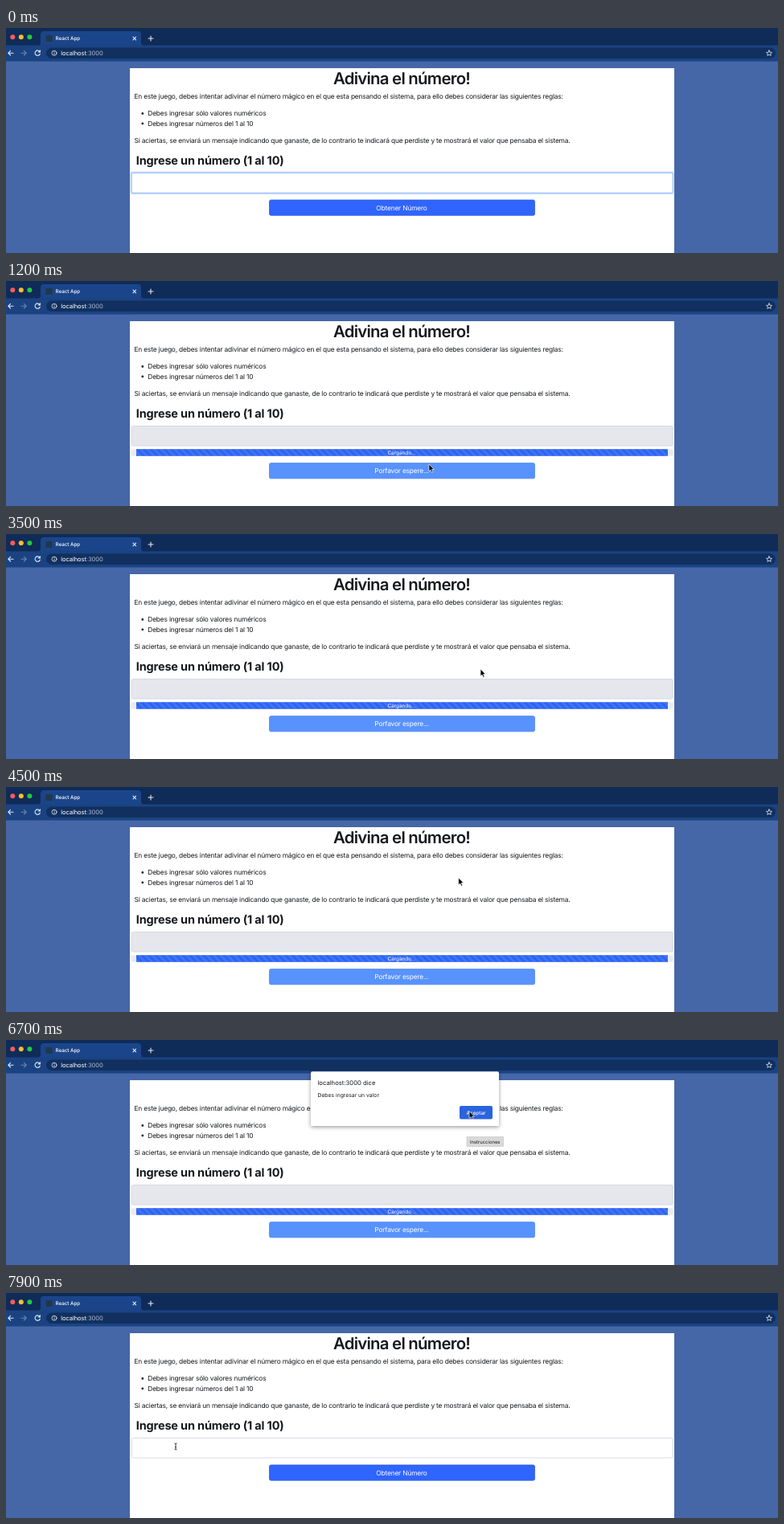
Animation, 960 px wide and 280 px high, one loop 8 s. Source, as an HTML page:

```html
<!DOCTYPE html>
<html lang="es">
<head>
<meta charset="utf-8">
<title>Adivina el número</title>
<style>
  html, body { margin: 0; width: 100%; height: 100%; overflow: hidden; background: #4567a7; }
  svg { display: block; width: 960px; height: 280px; }
  text { font-family: Inter, "Open Sans", sans-serif; font-size: 8.4px; fill: #16191d; text-rendering: geometricPrecision; white-space: pre; }
  .body { letter-spacing: -.183px; }
  .mid { text-anchor: middle; }
  .light { fill: #fff; }
  .line { fill: none; stroke: #e4ebf5; stroke-width: 1.1; stroke-linecap: round; stroke-linejoin: round; }
  .thin { stroke-width: .8; }
  .arrow { fill: #000; stroke: #fff; stroke-width: .7; stroke-linejoin: round; }
</style>
</head>
<body>
<svg viewBox="0 0 960 280">
  <defs>
    <pattern id="stripes" width="8.5" height="8.5" patternUnits="userSpaceOnUse">
      <path d="M0 0H4.25L8.5 4.25V8.5ZM0 4.25L4.25 8.5H0Z" fill="#fff" fill-opacity=".11"/>
    </pattern>
    <filter id="shadow" x="-10%" y="-20%" width="120%" height="150%">
      <feDropShadow dx="0" dy="1.5" stdDeviation="2.5" flood-opacity=".4"/>
    </filter>
  </defs>

  <!-- browser -->
  <rect width="960" height="280" fill="#4567a7"/>
  <rect width="960" height="22" fill="#0f2b57"/>
  <path d="M39 22Q43 22 43 18V8Q43 4 47 4H164Q168 4 168 8V18Q168 22 172 22Z" fill="#1b458a"/>
  <rect y="21.5" width="960" height="20" fill="#1b4382"/>
  <rect x="50" y="24.5" width="907" height="13.5" rx="6.75" fill="#11305f"/>
  <circle cx="8.3" cy="11.3" r="3" fill="#fc5b57"/>
  <circle cx="18.8" cy="11.3" r="3" fill="#fdbc2e"/>
  <circle cx="29.4" cy="11.3" r="3" fill="#28c840"/>
  <rect x="49.5" y="9" width="8" height="8" fill="#20384a"/>
  <text x="61.5" y="15.4" class="light" style="font-size:6.3px;font-weight:500;letter-spacing:-.05px">React App</text>
  <g class="line">
    <path d="M158 11.2L161.6 14.8M161.6 11.2L158 14.8M177 13H183M180 10V16"/>
    <path d="M9 31.2H2.8M5.6 28.4L2.8 31.2L5.6 34"/>
    <path d="M19 31.2H25.2M22.4 28.4L25.2 31.2L22.4 34" opacity=".4"/>
    <path d="M42 29.4A3.2 3.2 0 1 0 42.3 32.2M42.4 27.8V30H40.2"/>
    <g class="thin">
      <circle cx="60" cy="31.2" r="3"/><path d="M60 31V32.8M60 29.5V29.6"/>
      <path d="M949 27.8L950 30.2L952.5 30.4L950.6 32L951.2 34.4L949 33.1L946.8 34.4L947.4 32L945.5 30.4L948 30.2Z"/>
    </g>
  </g>
  <text x="68.3" y="34" class="light" style="font-size:7.6px;letter-spacing:-.1px">localhost<tspan fill="#a9b9d3">:3000</tspan></text>

  <!-- page -->
  <rect x="154" y="50" width="677" height="231" fill="#fff"/>
  <text x="492" y="70" class="mid" style="font-size:20.4px;font-weight:600;letter-spacing:-.75px">Adivina el número!</text>
  <g class="body">
    <text x="159.5" y="88.2">En este juego, debes intentar adivinar el número mágico en el que esta pensando el sistema, para ello debes considerar las siguientes reglas:</text>
    <circle cx="169.8" cy="106.4" r="1.3"/><text x="176.3" y="109.2">Debes ingresar sólo valores numéricos</text>
    <circle cx="169.8" cy="118.9" r="1.3"/><text x="176.3" y="121.7">Debes ingresar números del 1 al 10</text>
    <text x="159.5" y="142.6">Si aciertas, se enviará un mensaje indicando que ganaste, de lo contrario te indicará que perdiste y te mostrará el valor que pensaba el sistema.</text>
  </g>
  <text x="161.8" y="170.4" style="font-size:14.5px;font-weight:700;letter-spacing:-.17px">Ingrese un número (1 al 10)</text>
  <rect id="ring" x="154.6" y="178.6" width="676" height="28.4" rx="3" fill="#c3d9fd"/>
  <rect id="input" x="156.3" y="180.5" width="672.8" height="24.6" rx="2" stroke-width=".8"/>

  <g id="progress">
    <rect x="155.5" y="209.2" width="674" height="8.6" rx="2" fill="#e9ecef"/>
    <rect x="162" y="209.2" width="661" height="8.6" fill="#2a62f4"/>
    <rect x="162" y="209.2" width="661" height="8.6" fill="url(#stripes)"/>
    <text x="492" y="215.8" class="mid light" style="font-size:6.4px">Cargando...</text>
  </g>
  <g id="button">
    <rect id="face" x="327.5" y="214" width="330" height="19.2" rx="2" stroke-width=".8"/>
    <text id="label" x="492" y="226.8" class="body mid light"></text>
  </g>

  <!-- alert -->
  <g id="tip">
    <rect x="573" y="120.5" width="45.5" height="11.8" fill="#d9d9d9" stroke="#c4c4c4" stroke-width=".6"/>
    <text x="595.7" y="128.6" class="mid" style="font-size:5.9px">Instrucciones</text>
  </g>
  <g id="dialog">
    <rect x="379" y="39.3" width="234" height="67.8" rx="2" fill="#fff" filter="url(#shadow)"/>
    <text x="387.5" y="55.6" style="font-size:7.7px">localhost:3000 dice</text>
    <text x="387.5" y="71.2" style="font-size:6.8px">Debes ingresar un valor</text>
    <rect x="564" y="82" width="41" height="16.6" rx="2" fill="#2a63dc"/>
    <text x="584.5" y="92.6" class="mid light" style="font-size:6.4px;font-weight:500">Aceptar</text>
  </g>

  <!-- pointers, hot spot at 0,0 -->
  <g id="pointer">
    <path id="arrow" class="arrow" d="M0 0V9L2 7.2L3.5 10.4L5 9.7L3.6 6.6H6.4Z"/>
    <path id="hand" d="M-1 .6Q-1 -.4 -.2 -.4T.6 .6V3.2Q1.5 2.6 2 3.5Q2.9 3 3.3 3.9Q4.4 3.6 4.4 4.8V6.4L3.5 9H-.4L-3 5.3Q-2.6 4.2 -1 5.6Z" fill="#fff" stroke="#000" stroke-width=".8"/>
    <path id="beam" d="M-1.5 -4Q0 -4 0 -3V3Q0 4 -1.5 4M1.5 -4Q0 -4 0 -3M1.5 4Q0 4 0 3M-.9 .8H.9" fill="none" stroke="#222" stroke-width=".9"/>
  </g>
</svg>
<script>
  const LOOP = 8000, STEP = 100;
  const CLICK = 1200, TIP = 5900, ALERT = 6100, CLOSE = 7300;
  const $ = id => document.getElementById(id);
  const show = (id, on) => $(id).setAttribute('visibility', on ? 'visible' : 'hidden');
  const set = (id, attrs) => { for (const k in attrs) $(id).setAttribute(k, attrs[k]); };

  // time, x, y
  const path = [
    [100, 720, 292], [800, 526, 228], [2200, 525.5, 227.3], [3200, 590, 168],
    [3700, 590, 168], [4700, 559.5, 106.5], [5600, 559.5, 106.5], [5800, 563, 109],
    [6100, 563, 109], [6500, 576, 88.5], [7300, 576, 88.5], [7800, 211, 191]
  ];

  function pointerAt(t) {
    const i = path.findIndex(p => p[0] > t);
    if (i < 0) return path[path.length - 1].slice(1);
    if (i === 0) return path[0].slice(1);
    const [t0, x0, y0] = path[i - 1], [t1, x1, y1] = path[i];
    const k = (t - t0) / (t1 - t0), e = k * k * (3 - 2 * k);
    return [x0 + (x1 - x0) * e, y0 + (y1 - y0) * e];
  }

  function draw(t) {
    const loading = t >= CLICK && t < CLOSE;
    const focused = t < CLICK;
    const [x, y] = pointerAt(t);
    const inButton = !loading && x > 327 && x < 658 && y > 213 && y < 234;
    const inInput = !loading && x > 156 && x < 829 && y > 180 && y < 206;
    const [fill, stroke] = loading ? ['#5892fd', '#5087f6']
      : inButton ? ['#2952d3', '#244abf'] : ['#3065fd', '#2b5ae6'];

    show('ring', focused);
    set('input', { fill: loading ? '#e5e7ec' : '#fff', stroke: focused ? '#8fb9fb' : '#cdd2dc' });
    show('progress', loading);
    set('stripes', { x: 8.5 * (1 - t % 1000 / 1000) });
    set('button', { transform: `translate(0 ${loading ? 12.6 : 0})` });
    set('face', { fill, stroke });
    $('label').textContent = loading ? 'Porfavor espere...' : 'Obtener Número';
    show('tip', t >= TIP && t < CLOSE);
    show('dialog', t >= ALERT && t < CLOSE);

    set('pointer', { transform: `translate(${x} ${y})` });
    show('hand', inButton);
    show('beam', inInput);
    show('arrow', !inButton && !inInput);
  }

  const start = performance.now();
  function tick() {
    const t = (performance.now() - start) % LOOP;
    draw(Math.floor(t / STEP) * STEP);
    requestAnimationFrame(tick);
  }
  tick();
</script>
</body>
</html>
```
